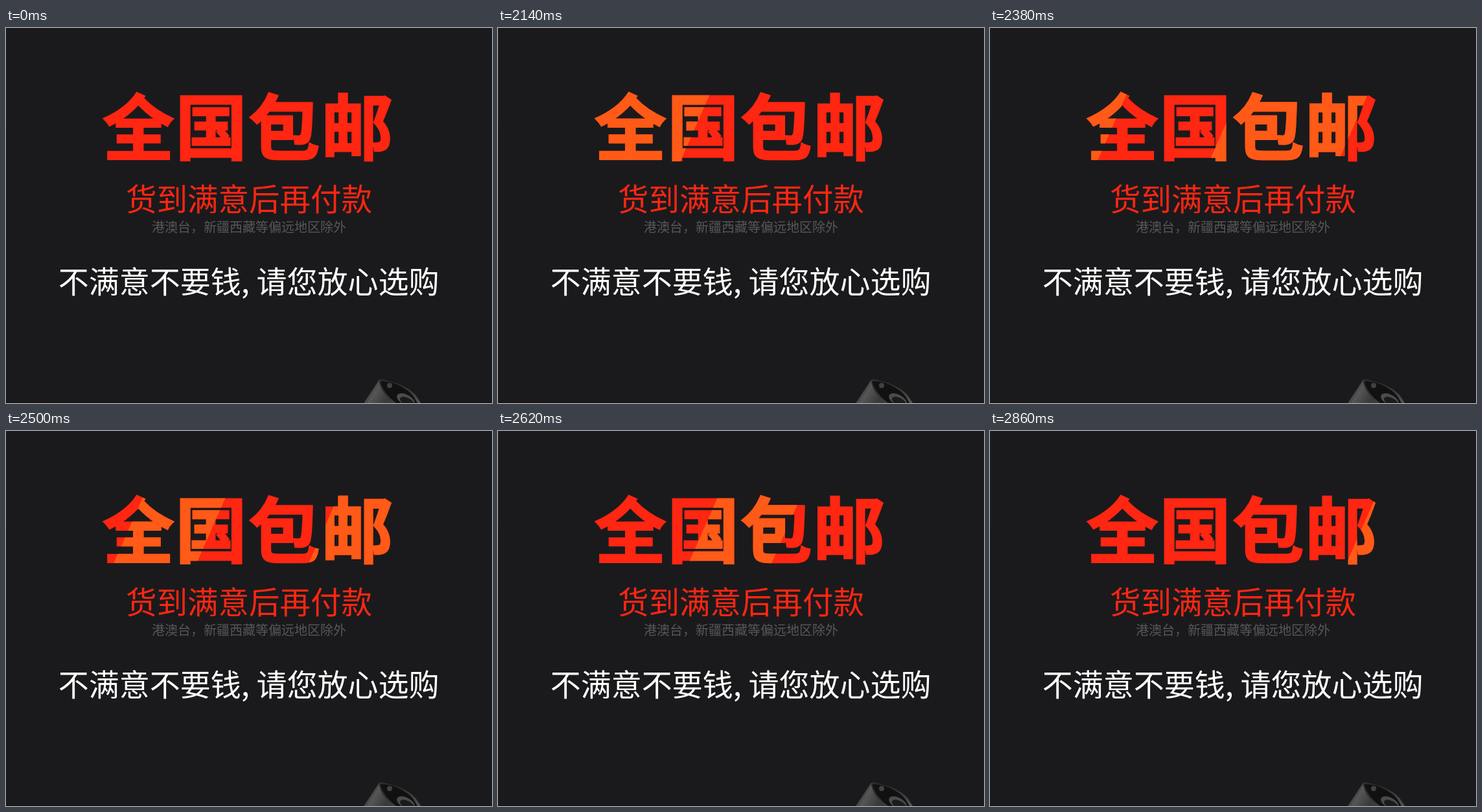
Animation, 750 px wide and 579 px high, one loop 2.92 s. Source, as an HTML page:

```html
<!DOCTYPE html>
<html lang="zh-CN">
<head>
<meta charset="utf-8">
<title>全国包邮</title>
<style>
  html, body { margin: 0; width: 100%; height: 100%; overflow: hidden; background: #1a1a1c; }
  svg { display: block; width: 750px; height: 579px; }
  text { font-family: "Noto Sans CJK SC", "Noto Sans CJK", "Noto Sans CJK JP", sans-serif; white-space: pre; }
  .head { font-size: 110.5px; font-weight: 700; letter-spacing: 2px; stroke-width: 2.5px; stroke-linejoin: miter; }
  .heavy .head { font-size: 112.5px; font-weight: 900; letter-spacing: 0; stroke: none; }
  .red { fill: #ff2612; }
  .base { fill: #ff2612; stroke: #ff2612; }
  .shine { fill: #ff5a17; stroke: #ff5a17; }
</style>
</head>
<body>
<svg viewBox="0 0 750 579" lang="zh-CN">
  <defs>
    <linearGradient id="side" gradientUnits="userSpaceOnUse" x1="556" y1="562" x2="584" y2="579">
      <stop offset="0" stop-color="#2b2b2c"/>
      <stop offset=".35" stop-color="#565657"/>
      <stop offset="1" stop-color="#3a3a3b"/>
    </linearGradient>
    <linearGradient id="rim" x1="0" y1="0" x2="1" y2="1">
      <stop offset="0" stop-color="#222223"/>
      <stop offset=".6" stop-color="#3a3a3b"/>
      <stop offset="1" stop-color="#555556"/>
    </linearGradient>
    <clipPath id="bands">
      <path id="wide"/>
      <path id="narrow"/>
    </clipPath>
  </defs>

  <rect width="750" height="579" fill="#1a1a1c"/>
  <rect width="1" height="148" fill="#222224"/>
  <rect y="578" width="750" height="1" fill="#140e0f"/>

  <!-- Corner of the product -->
  <path d="M552 579 L574 546 Q576 542 581 543 L604 549 Q624 557 632 567 L640 579 Z" fill="url(#side)"/>
  <path d="M576 545 Q578 542 583 544 L604 549 Q624 557 632 567 L640 579 H598 Q578 563 576 545 Z" fill="url(#rim)"/>
  <path d="M578 546 Q591 545 605 551 Q622 559 629 569 L635 579 H602 Q583 565 578 546 Z" fill="#111112"/>
  <ellipse cx="617" cy="574" rx="15" ry="8" transform="rotate(28 617 574)" fill="#4b4b4c"/>
  <ellipse cx="619" cy="577" rx="12" ry="6" transform="rotate(28 619 577)" fill="#1b1b1c"/>
  <circle cx="592" cy="552" r="4" fill="#414142"/>

  <text class="head base" x="149" y="195">全国包邮</text>
  <g clip-path="url(#bands)" aria-hidden="true">
    <text class="head shine" x="149" y="195">全国包邮</text>
  </g>
  <text class="red" x="185.1" y="281.5" font-size="47.5">货到满意后再付款</text>
  <text x="225" y="315" font-size="20" fill="#575758">港澳台，新疆西藏等偏远地区除外</text>
  <text x="80.8" y="409" font-size="47" fill="#fff">不满意不要钱, 请您放心选购</text>
</svg>
<script>
  const LOOP = 2920, HOLD = 2020, STEP = 60, STRIDE = 64;
  const SLOPE = 0.44, MID = 150, TOP = 90, BOTTOM = 215;

  // Use the black weight where it is installed; otherwise the bold is outlined
  const pen = document.createElement('canvas').getContext('2d');
  function inkWidth(weight) {
    pen.font = `${weight} 400px "Noto Sans CJK SC", sans-serif`;
    const box = pen.measureText('国');
    return box.actualBoundingBoxRight + box.actualBoundingBoxLeft;
  }
  document.body.classList.toggle('heavy', inkWidth(900) !== inkWidth(700));

  // left and right are the band's edges at height MID on the first step
  const bands = [
    { el: document.getElementById('wide'), left: -21, right: 178 },
    { el: document.getElementById('narrow'), left: -322, right: -194 }
  ];
  const edge = (x, y) => `${x + SLOPE * (MID - y)} ${y}`;

  for (const { el, left, right } of bands) {
    el.setAttribute('d', `M${edge(left, TOP)} L${edge(right, TOP)} L${edge(right, BOTTOM)} L${edge(left, BOTTOM)} Z`);
  }

  function draw() {
    const t = performance.now() % LOOP;
    const step = t < HOLD ? -1 : Math.floor((t - HOLD) / STEP);
    for (const { el } of bands) el.setAttribute('transform', `translate(${step * STRIDE} 0)`);
    requestAnimationFrame(draw);
  }
  draw();
</script>
</body>
</html>
```
